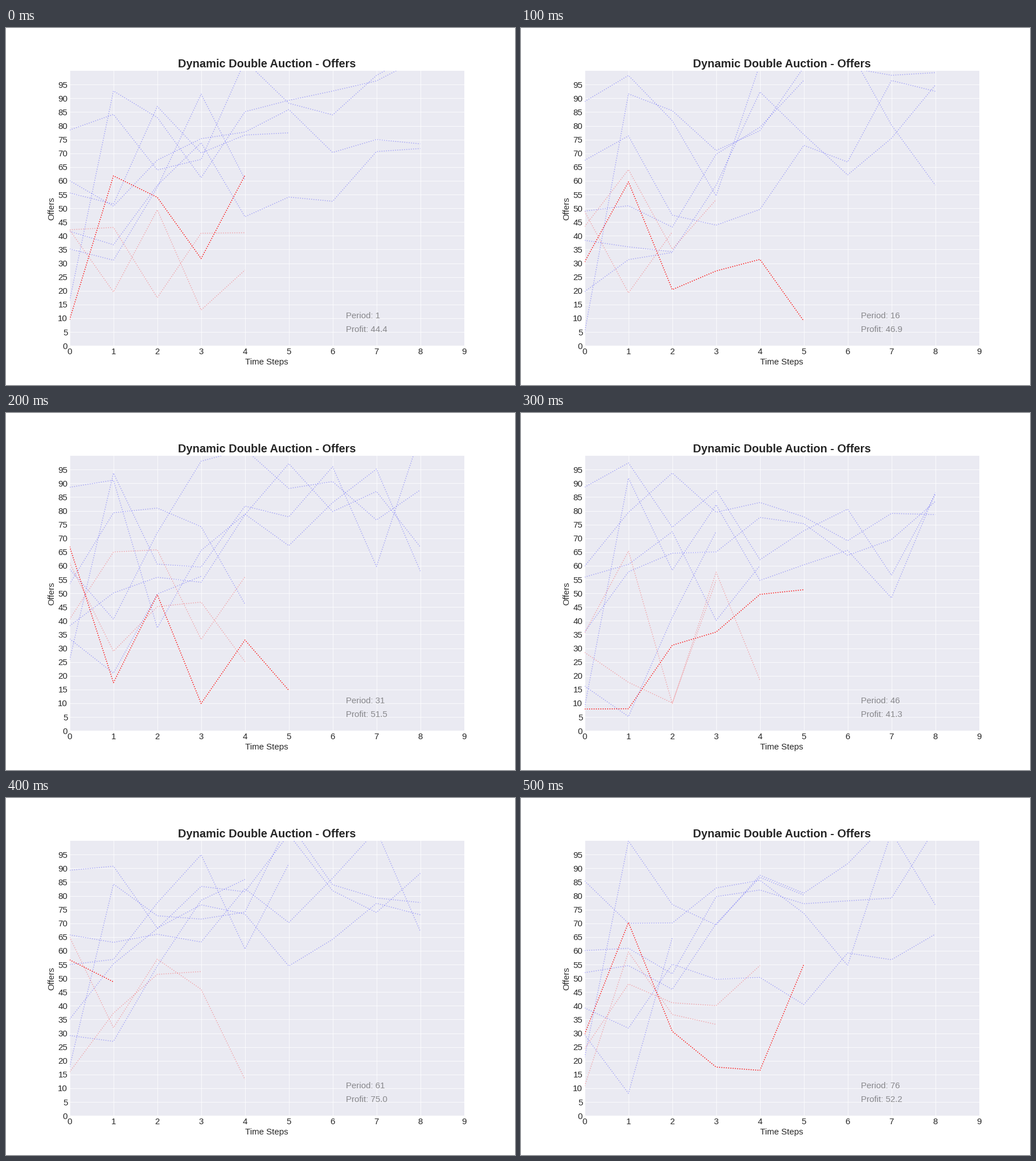
A matplotlib script that plays this animation: 894 px wide and 626 px high, repeating every 600 ms.

```python
import numpy as np
import matplotlib.pyplot as plt
from matplotlib.animation import FuncAnimation

WIDTH, HEIGHT, DPI = 894, 626, 100
PX = 72 / DPI  # points per pixel
INK = "0.15"
LAST_STEP = 8

# Profit and the buyer's own bids in each displayed period.
ROUNDS = [
    (44.4, [9.5, 61.8, 54, 31.7, 62]),
    (46.9, [30.5, 59.6, 20.4, 27.2, 31.4, 9]),
    (51.5, [67, 17.5, 49.5, 9.9, 33, 14.7]),
    (41.3, [7.9, 8, 31.1, 35.9, 49.6, 51.3]),
    (75.0, [56.7, 48.7]),
    (52.2, [29.7, 70.3, 30.7, 17.7, 16.5, 55]),
]
OPENING_ASKS = [15, 24, 40, 48, 60, 87]


def ask_path(rng, opening, last):
    """Offers move away from the opening, then swing round a rising level."""
    path = [opening + rng.normal(0, 5)]
    # The cheapest seller overcorrects at once; the others adjust slowly.
    path.append(88 + rng.normal(0, 6) if opening < 20
                else path[0] + rng.normal(2, 10))
    for step in range(2, last + 1):
        level = 62 + 3 * step
        path.append(path[-1] + 0.7 * (level - path[-1]) + rng.normal(0, 14))
    return path


def simulate(index):
    """All offer paths of a period: six asks, two rival bids, own bids."""
    rng = np.random.default_rng(100 + index)
    early = {1: rng.integers(2, 5), 3: rng.integers(4, 6)}
    asks = [ask_path(rng, opening, early.get(seller, LAST_STEP))
            for seller, opening in enumerate(OPENING_ASKS)]
    rivals = [rng.uniform(9, 66, rng.integers(low, low + 3))
              for low in (3, 4)]
    return asks + rivals + [ROUNDS[index][1]]


plt.rcParams.update({
    "font.family": "Liberation Sans",
    "font.size": 15 * PX,
    "text.color": INK,
    "axes.labelcolor": INK,
    "xtick.color": INK,
    "ytick.color": INK,
})

fig, ax = plt.subplots(figsize=(WIDTH / DPI, HEIGHT / DPI), dpi=DPI,
                       facecolor="white")
ax.set_facecolor("#EAEAF2")
ax.set(xlim=(0, 9), ylim=(0, 100), xticks=range(10), yticks=range(0, 100, 5))
ax.set_title("Dynamic Double Auction - Offers", size=20 * PX, weight="bold",
             pad=6 * PX)
ax.set_xlabel("Time Steps", labelpad=4 * PX)
ax.set_ylabel("Offers", labelpad=4 * PX)
ax.tick_params(length=0, pad=3.5 * PX)
ax.spines[:].set_visible(False)
ax.set_axisbelow(True)
ax.grid(color="white", linewidth=0.8 * PX)


def dotted(color, alpha):
    return ax.plot([], [], ":", color=color, alpha=alpha,
                   linewidth=1.5 * PX)[0]


lines = ([dotted("blue", 0.3) for _ in OPENING_ASKS]
         + [dotted("red", 0.3) for _ in range(2)]
         + [dotted("red", 1)])
period_text = ax.text(6.3, 10, "", alpha=0.5)
profit_text = ax.text(6.3, 5, "", alpha=0.5)


def update(index):
    for line, path in zip(lines, simulate(index)):
        line.set_data(range(len(path)), path)
    period_text.set_text(f"Period: {1 + 15 * index}")
    profit_text.set_text(f"Profit: {ROUNDS[index][0]:.1f}")
    return [*lines, period_text, profit_text]


anim = FuncAnimation(fig, update, frames=len(ROUNDS), interval=100,
                     repeat=True, repeat_delay=0)
plt.show()
```
